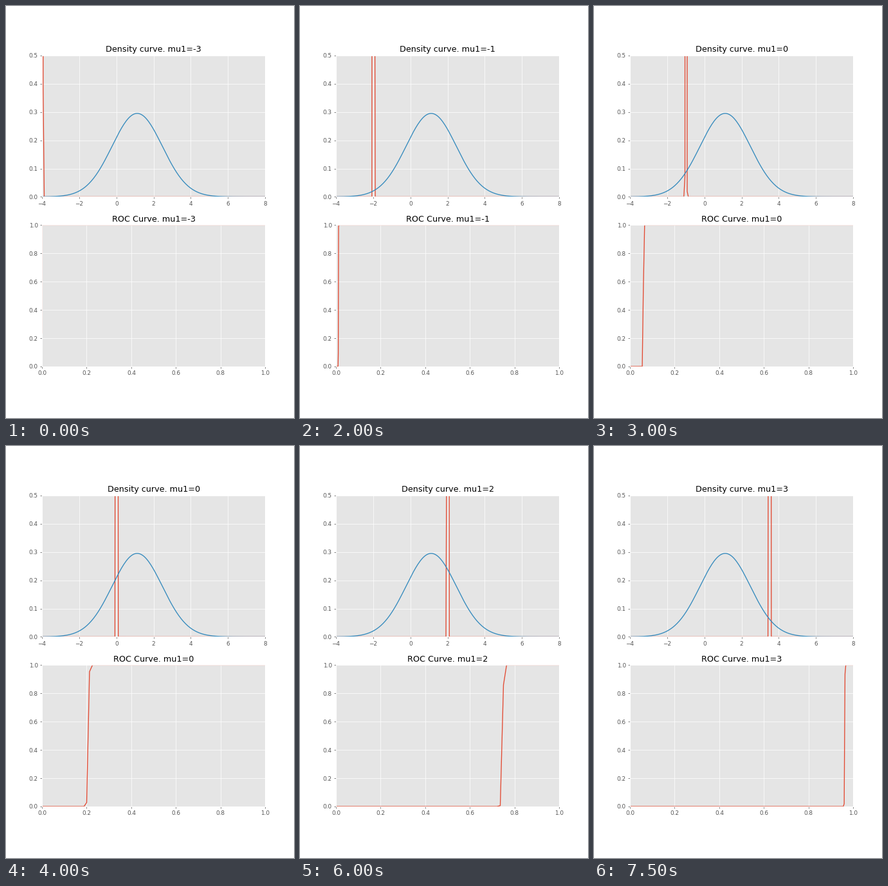
A matplotlib script for the animation above (8 s loop, 448 by 640 pixels).

```python
import math

import matplotlib.pyplot as plt
import numpy as np
from matplotlib.animation import FuncAnimation

FRAMES, INTERVAL = 16, 500
MU_START, MU_STEP, SIGMA1 = -3.988, 0.5, 0.0168
MU2, SIGMA2 = 1.117, 1.352

plt.style.use("ggplot")
plt.rcParams["font.family"] = "DejaVu Sans"


def pdf(x, mu, sigma):
    return np.exp(-(((x - mu) / sigma) ** 2) / 2) / (sigma * math.sqrt(2 * math.pi))


def cdf(x, mu, sigma):
    return np.array([math.erfc((mu - v) / (sigma * math.sqrt(2))) / 2 for v in x])


x = np.linspace(-4, 8, 200)
false_rate = cdf(x, MU2, SIGMA2)

fig, (top, bottom) = plt.subplots(2, 1, figsize=(7, 10), dpi=64)
fig.set_facecolor("white")
fig.subplots_adjust(left=0.125, right=0.9, bottom=0.125, top=0.88, hspace=0.2)

top.set(xlim=(-4, 8), ylim=(0, 0.5))
bottom.set(xlim=(0, 1), ylim=(0, 1))
density, = top.plot([], [])
top.plot(x, pdf(x, MU2, SIGMA2))
roc, = bottom.plot([], [])


def update(i):
    mu = MU_START + MU_STEP * i
    density.set_data(x, pdf(x, mu, SIGMA1))
    roc.set_data(false_rate, cdf(x, mu, SIGMA1))
    top.set_title(f"Density curve. mu1={int(mu)}")
    bottom.set_title(f"ROC Curve. mu1={int(mu)}")
    return density, roc


anim = FuncAnimation(fig, update, frames=FRAMES, interval=INTERVAL,
                     repeat=True, repeat_delay=0)
plt.show()
```
